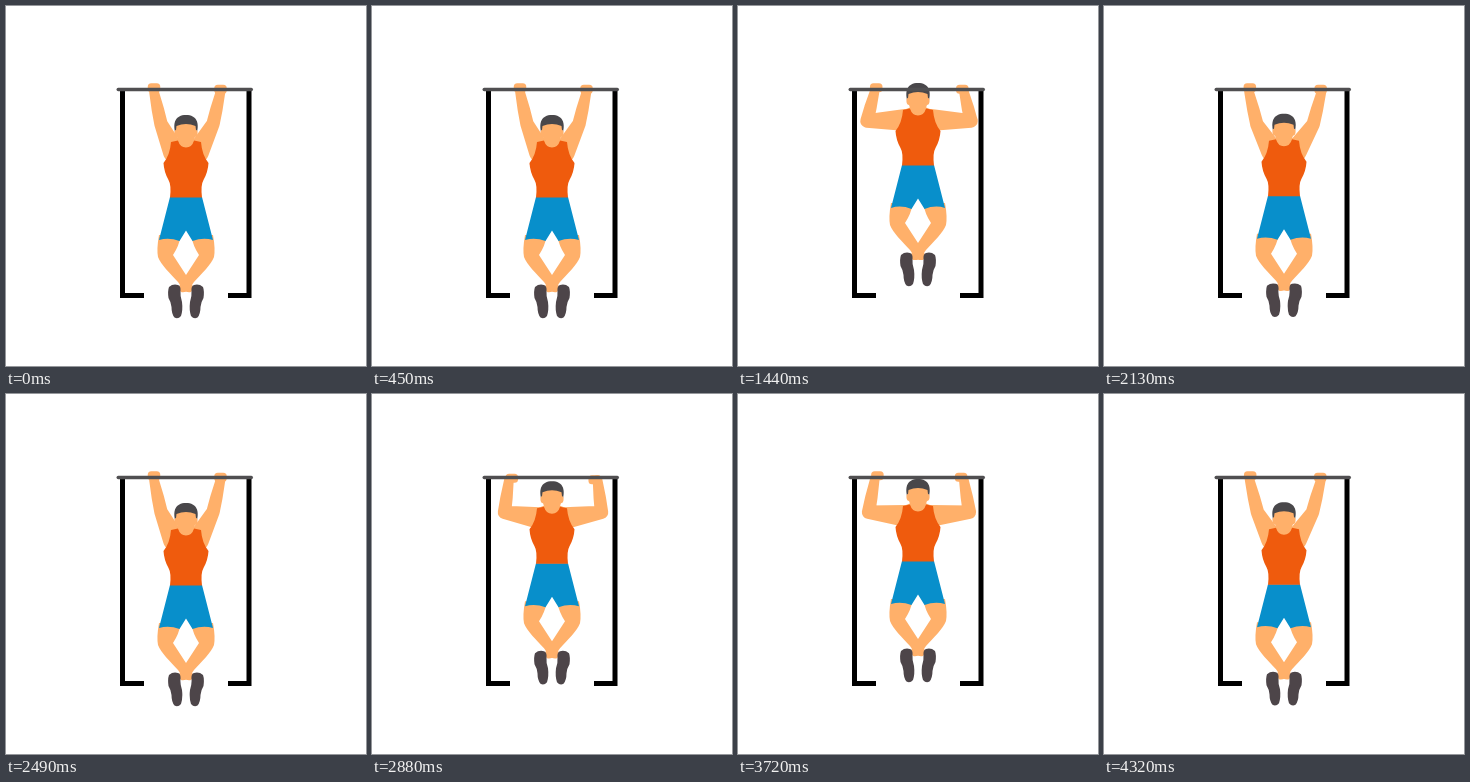
Write an HTML page that moves like this. It is 360x360 px and loops after 4.35 s.

```html
<!DOCTYPE html>
<html lang="en">
<head>
<meta charset="utf-8">
<title>Pull-ups</title>
<style>
  html, body { margin: 0; width: 100%; height: 100%; overflow: hidden; background: #fff; }
  svg { display: block; width: 100vw; height: 100vh; }
  .skin { fill: #ffb06a; }
  .shirt { fill: #ef5b0d; }
  .shorts { fill: #088fcb; }
  .hair { fill: #49474a; }
  .shoe { fill: #4d4549; }
</style>
</head>
<body>
<svg viewBox="0 0 360 360">
  <path d="M116.500 84V289.500H138M243 84V289.500H222" fill="none" stroke="#000" stroke-width="5"/>
  <g class="skin">
    <path id="armL"/>
    <path id="armR"/>
    <rect id="handL" width="12.500" height="9" rx="3.500"/>
    <rect id="handR" width="12.500" height="9" rx="3.500"/>
  </g>
  <g id="body">
    <defs>
      <path id="leg" d="M153 229H175Q173 240 167 249L180 269L186 278Q188 283 185 286Q180 287 177 283L172 276C164 267 155 259 152 251Q150.500 243 153 229Z"/>
      <path id="shoe" d="M163 281Q167 277.500 172 279Q175 280 174.500 285Q174 290 176 296Q177 304 175 310Q172 313.500 168.500 311.500Q165.500 308 165.500 301Q165 296 162.500 292Q161.500 285 163 281Z"/>
    </defs>
    <use href="#leg" class="skin"/>
    <use href="#leg" class="skin" transform="matrix(-1 0 0 1 360 0)"/>
    <use href="#shoe" class="shoe"/>
    <use href="#shoe" class="shoe" transform="matrix(-1 0 0 1 360 0)"/>
    <path class="shorts" d="M164 191H196L207 234Q197 231 186.500 235L180 224.500L173.500 235Q163 231 153 234Z"/>
    <path class="skin" d="M163 137L173 133H187L197 137L190 150H170Z"/>
    <path class="shirt" d="M165 136L172 134.500Q174 141.500 180 141.500Q186 141.500 188 134.500L195 136Q196 149 202.500 157Q202 166 197.500 174Q194.500 179 196 191.500H164Q165.500 179 162.500 174Q158 166 157.500 157Q164 149 165 136Z"/>
    <path class="hair" d="M169 126C167 117 169 109 180 109C191 109 193 117 191 126Z"/>
    <path class="skin" d="M170.500 120Q180 116 189.500 120L190 124Q192 124 191.500 128Q191 131 189 131Q187 139 180 139Q173 139 171 131Q169 131 168.500 128Q168 124 170 124Z"/>
  </g>
  <rect x="110.500" y="81.800" width="136.500" height="3.400" rx="1.700" fill="#504f51"/>
</svg>
<script>
const LOOP = 4350, REP = LOOP / 2, STEP = 30;

const $ = id => document.getElementById(id);
const mix = (a, b, u) => a + (b - a) * u;

// eased progress from time a to time b
function ease(t, a, b) {
  const u = Math.min(1, Math.max(0, (t - a) / (b - a)));
  return u * u * (3 - 2 * u);
}

// fast pull, slower finish, then a controlled descent
const height = t => 22 * ease(t, 500, 720) + 18 * ease(t, 700, 1260)
  - 36 * ease(t, 1240, 1900) - 4 * ease(t, 2000, 2200);
const gripDrop = t => 2.5 * (ease(t, 540, 705) - ease(t, 900, 1300));

// outline around two circles [x, y, radius]
function taper([ax, ay, ar], [bx, by, br]) {
  const dir = Math.atan2(by - ay, bx - ax);
  const side = Math.acos((ar - br) / Math.hypot(bx - ax, by - ay));
  const at = (x, y, r, a) =>
    `${(x + r * Math.cos(a)).toFixed(2)} ${(y + r * Math.sin(a)).toFixed(2)}`;
  const wide = side > Math.PI / 2 ? 1 : 0;
  return `M${at(ax, ay, ar, dir + side)}L${at(bx, by, br, dir + side)}`
    + `A${br} ${br} 0 ${wide} 0 ${at(bx, by, br, dir - side)}`
    + `L${at(ax, ay, ar, dir - side)}`
    + `A${ar} ${ar} 0 ${1 - wide} 0 ${at(ax, ay, ar, dir + side)}Z`;
}

function drawArm(side, lift, drop) {
  const right = side === "R";
  const bend = Math.min(1, (lift / 26) ** 0.8);
  const slide = Math.min(1.05, (lift / 30) ** 0.45);
  const place = (x, shift) => right ? 360 - x + shift : x;

  const handX = place(148 - 9.5 * slide, 2.5);
  const wrist = [place(148 - mix(9.5 * slide, 11.5, bend), 2.5), 86, 4.8];
  const elbow = [place(mix(155, 129, bend), 2), mix(118, 131, bend) - lift / 2, 6.7];
  const forearm = [mix(wrist[0], elbow[0], 0.55), mix(wrist[1], elbow[1], 0.55), 6.2];
  const shoulder = [place(168, 0), 146 - lift, 11];

  $("arm" + side).setAttribute("d",
    taper(wrist, forearm) + taper(forearm, elbow) + taper(elbow, shoulder));
  $("hand" + side).setAttribute("x", handX - 6.25);
  $("hand" + side).setAttribute("y", 77.2 + drop + (right ? 1.5 : 0));
}

function draw(now) {
  const t = Math.floor((now % LOOP) / STEP) * STEP % REP;
  const lift = Math.max(0, height(t)), drop = gripDrop(t);
  $("body").setAttribute("transform", `translate(0 ${-lift.toFixed(2)})`);
  drawArm("L", lift, drop);
  drawArm("R", lift, drop);
}

const start = performance.now();
function tick() {
  draw(performance.now() - start);
  requestAnimationFrame(tick);
}
tick();
</script>
</body>
</html>
```
